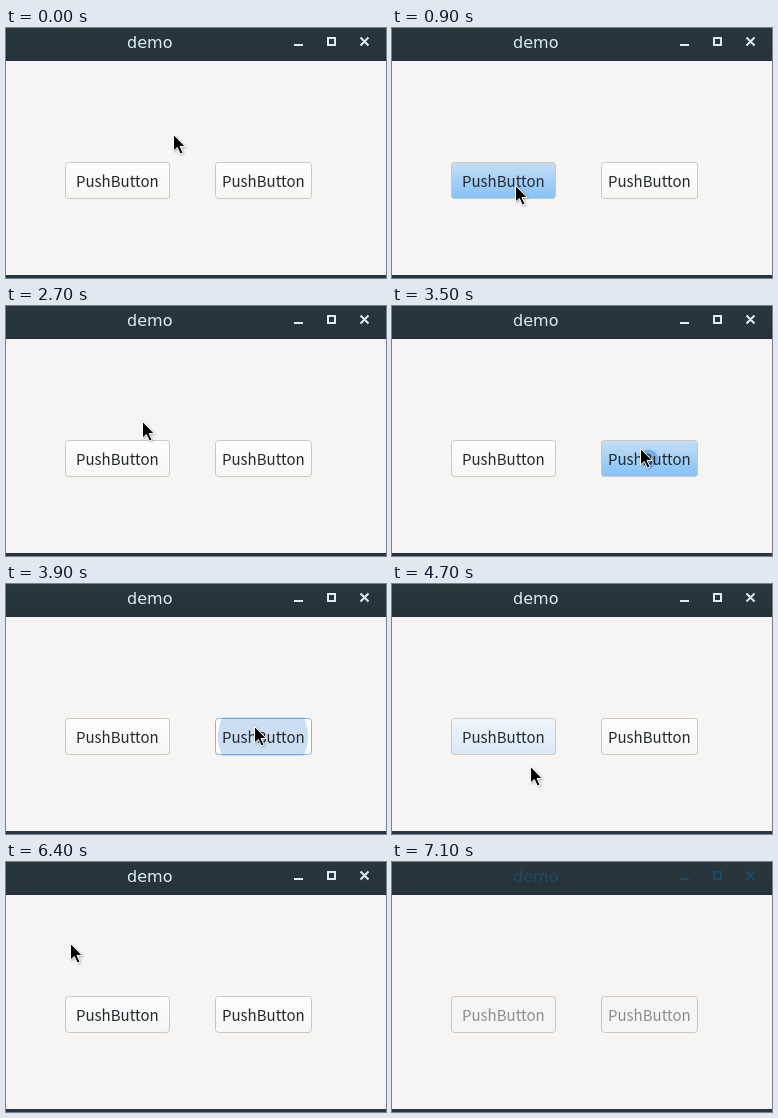
Write an HTML page that moves like this. It is 380 by 250 pixels and loops after 7200 ms.

```html
<!DOCTYPE html>
<html lang="en">
<head>
<meta charset="utf-8">
<title>demo</title>
<style>
html, body { margin: 0; width: 100%; height: 100%; overflow: hidden; background: #f6f5f4; }
svg { display: block; }
.label { font: 15px "Noto Sans CJK SC", "Noto Sans CJK", "Noto Sans CJK JP", "Noto Sans", sans-serif; text-anchor: middle; }
.title { font: 16px "DejaVu Sans", sans-serif; text-anchor: middle; }
#cursor { filter: drop-shadow(1px 1px 1px #0004); }
</style>
</head>
<body>
<svg id="stage" width="380" height="250" viewBox="0 0 380 250">
  <defs>
    <linearGradient id="bar" x2="0" y2="1">
      <stop stop-color="#29373d"/><stop offset=".9" stop-color="#26343a"/><stop offset="1" stop-color="#24303e"/>
    </linearGradient>
    <linearGradient id="idle" x2="0" y2="1">
      <stop stop-color="#fefefe"/><stop offset="1" stop-color="#f6f6f5"/>
    </linearGradient>
    <linearGradient id="hover" x2="0" y2="1">
      <stop stop-color="#c6def4"/><stop offset="1" stop-color="#84c1f9"/>
    </linearGradient>
  </defs>
  <rect width="380" height="250" fill="#f6f5f4"/>
  <rect width="380" height="33" fill="url(#bar)"/>
  <rect y="247" width="380" height="3" fill="#263642"/>
  <g id="caption">
    <text class="title" x="143.8" y="20">demo</text>
    <path id="controls" d="M288 17h9M322 10h7v7h-7zM354.500 9.500l8 8m0-8l-8 8" fill="none" stroke-width="2"/>
  </g>
  <g id="buttons"></g>
  <path id="cursor" d="M.5 .5V17l3.800-3.500 3 6.500 2.700-1.200-3-6.300h5.200z" fill="#000" stroke="#fff"/>
</svg>
<script>
const LOOP = 7200, STEP = 100;
const $ = id => document.getElementById(id);
const ramp = (t, from, length) => Math.min(1, Math.max(0, (t - from) / length));
const smooth = p => p * p * (3 - 2 * p);
const mix = (a, b, p) => `rgb(${a.map((v, i) => Math.round(v + (b[i] - v) * p))})`;

// Each move is one eased curve from the previous rest point, bent toward "via".
const home = [167, 106];
const moves = [
  { from: 200, to: 900, via: [145, 132], end: [123, 157] },
  { from: 2300, to: 3100, via: [87, 80], end: [248, 142] },
  { from: 4200, to: 4900, via: [180, 232], end: [111, 159] },
  { from: 6200, to: 6700, via: [44, 49], end: [-23, -62] }
];

// Times at which the pointer enters a button, presses it and leaves it.
const buttons = [
  { x: 59, w: 105, visits: [{ enter: 500, press: 1400, leave: 2300 }, { enter: 4600, press: 5500, leave: 6200 }] },
  { x: 209, w: 97, visits: [{ enter: 2800, press: 3500, leave: 4200 }] }
];

buttons.forEach((b, i) => {
  const cx = b.x + b.w / 2;
  const box = `x="${b.x + .5}" y="134.5" width="${b.w - 1}" height="36" rx="3"`;
  $("buttons").insertAdjacentHTML("beforeend", `<g>
    <clipPath id="clip${i}"><rect x="${b.x - 1}" y="133" width="${b.w + 2}" height="39" rx="4"/></clipPath>
    <rect ${box}/>
    <rect ${box} fill="url(#hover)"/>
    <rect ${box} fill="none"/>
    <g clip-path="url(#clip${i})"><circle cx="${cx - .5}" cy="152.500" fill="#4a90d9"/></g>
    <text class="label" x="${cx - .2}" y="159">PushButton</text></g>`);
  const g = $("buttons").lastElementChild;
  [b.base, b.glow, b.edge] = g.querySelectorAll(":scope > rect");
  b.ripple = g.querySelector("circle");
  b.label = g.querySelector("text");
});

function pointer(t) {
  let at = home;
  for (const m of moves) {
    if (t <= m.from) break;
    const p = smooth(ramp(t, m.from, m.to - m.from)), q = 1 - p;
    at = at.map((v, i) => q * q * v + 2 * p * q * m.via[i] + p * p * m.end[i]);
  }
  return at.map(Math.round);
}

// The fill grows on entry, drains after a press and leaves a faint flash behind.
function glow(t, { enter, press, leave }) {
  if (t <= press) return ramp(t, enter, 400);
  if (t <= leave) return 1 - ramp(t, press, 200);
  return .1 * (1 - ramp(t, leave, 300));
}

function drawButton(b, t, away) {
  const visit = b.visits.findLast(v => t >= v.enter) ?? b.visits[0];
  const pressed = t > visit.press && t <= visit.leave;
  const k = t < visit.press ? 8 : (t - visit.press) / STEP;
  b.base.setAttribute("fill", pressed ? "#fcfcfc" : "url(#idle)");
  b.base.setAttribute("opacity", 1 - away);
  b.glow.setAttribute("opacity", glow(t, visit));
  b.edge.setAttribute("stroke", pressed ? "#7ab8ef" : "#cdc7c2");
  b.ripple.setAttribute("r", 9 + 9 * k);
  b.ripple.setAttribute("opacity", .55 * Math.max(0, 1 - k / 8));
  b.label.setAttribute("fill", mix([35, 40, 43], [139, 142, 143], away));
}

function draw(t) {
  $("cursor").setAttribute("transform", `translate(${pointer(t)})`);
  const away = ramp(t, 6700, 300);
  const ink = mix([220, 238, 244], [23, 76, 108], away);
  $("caption").setAttribute("fill", ink);
  $("controls").setAttribute("stroke", ink);
  for (const b of buttons) drawButton(b, t, away);
}

const start = performance.now();
function frame() {
  const t = (performance.now() - start) % LOOP;
  draw(Math.floor(t / STEP) * STEP);
  requestAnimationFrame(frame);
}
frame();
</script>
</body>
</html>
```
